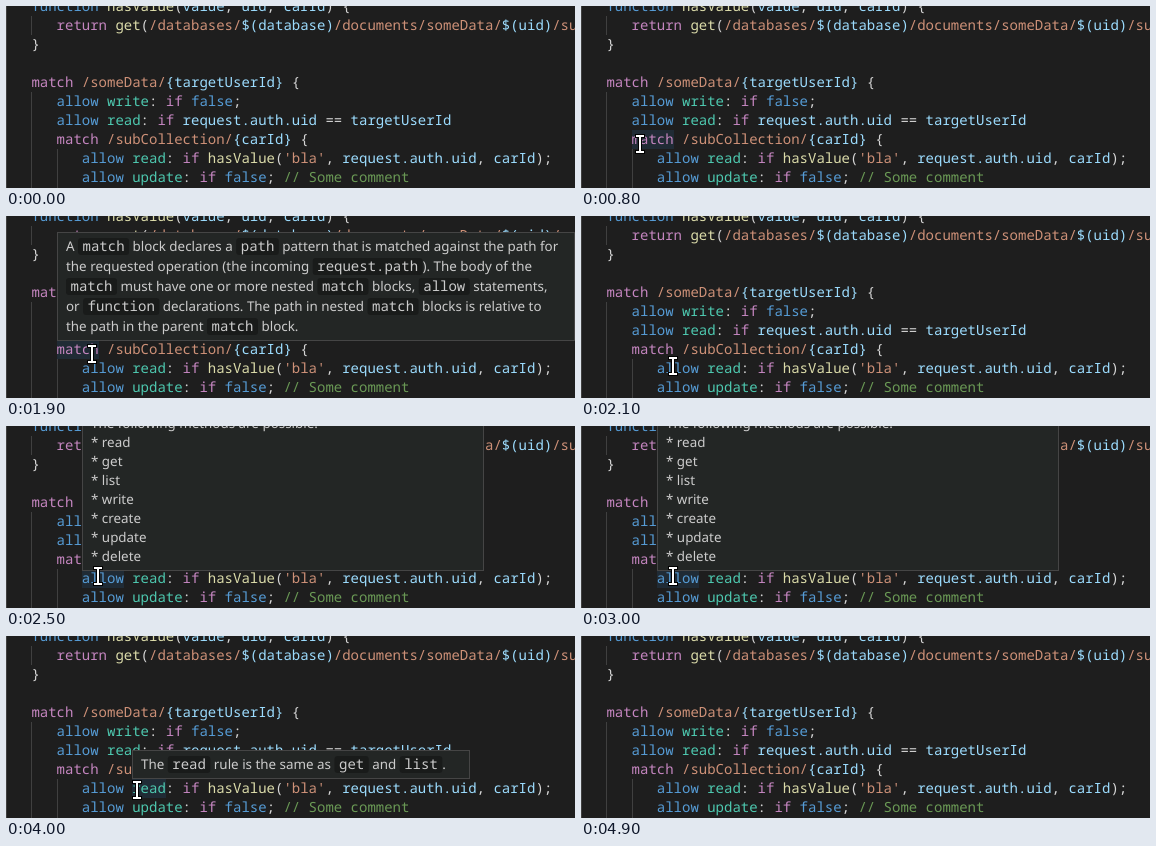
Recreate the animation shown at these times as an HTML page with a canvas. Size 569 px wide and 182 px high, loop 6000 ms.

```html
<!DOCTYPE html>
<html lang="en">
<head>
<meta charset="utf-8">
<style>
  html, body { margin: 0; height: 100%; overflow: hidden; background: #1e1e1e; }
  canvas { display: block; }
</style>
</head>
<body>
<canvas width="569" height="182"></canvas>
<script>
const ctx = document.querySelector('canvas').getContext('2d');
const LOOP = 6000, STEP = 100, LEFT = 0.2, CHAR = 8.4, ROW = 19, CHIP_PAD = 4.5;
const MONO = '14px "Noto Sans Mono", monospace';
const SANS = '13.4px "Noto Sans", sans-serif';

const colors = {
  k: '#569cd6', p: '#c586c0', f: '#dcdcaa', v: '#9cdcfe',
  o: '#ce9178', t: '#4ec9b0', w: '#d4d4d4', c: '#6a9955'
};

// Each row: indent level, then colour key and text in turn.
const code = [
  [1, 'k', 'function ', 'f', 'hasValue', 'w', '(', 'v', 'value', 'w', ', ', 'v', 'uid', 'w', ', ', 'v', 'carId', 'w', ') {'],
  [2, 'p', 'return ', 'f', 'get', 'w', '(', 'o', '/databases/', 'v', '$(database)', 'o', '/documents/someData/', 'v', '$(uid)', 'o', '/subCollection/'],
  [1, 'w', '}'],
  [0],
  [1, 'p', 'match ', 'o', '/someData/', 'v', '{targetUserId}', 'w', ' {'],
  [2, 'k', 'allow ', 't', 'write', 'w', ': ', 'p', 'if ', 'k', 'false', 'w', ';'],
  [2, 'k', 'allow ', 't', 'read', 'w', ': ', 'p', 'if ', 'v', 'request.auth.uid', 'w', ' == ', 'v', 'targetUserId'],
  [2, 'p', 'match ', 'o', '/subCollection/', 'v', '{carId}', 'w', ' {'],
  [3, 'k', 'allow ', 't', 'read', 'w', ': ', 'p', 'if ', 'f', 'hasValue', 'w', '(', 'o', "'bla'", 'w', ', ', 'v', 'request.auth.uid', 'w', ', ', 'v', 'carId', 'w', ');'],
  [3, 'k', 'allow ', 't', 'update', 'w', ': ', 'p', 'if ', 'k', 'false', 'w', '; ', 'c', '// Some comment']
];

const hovers = [
  {
    from: 800, to: 2100, fade: 900, word: [51, 124, 42],
    box: [51, 16, 518, 109], baseline: 35, leading: 20,
    lines: [
      'A `match` block declares a `path` pattern that is matched against the path for',
      'the requested operation (the incoming `request.path`). The body of the',
      '`match` must have one or more nested `match` blocks, `allow` statements,',
      'or `function` declarations. The path in nested `match` blocks is relative to',
      'the path in the parent `match` block.'
    ]
  },
  {
    from: 2400, to: 3500, fade: 2400, word: [76, 143, 42],
    box: [76, -60, 402, 205], baseline: 2, leading: ROW,
    lines: ['The following methods are possible:', '* read', '* get', '* list', '* write', '* create', '* update', '* delete']
  },
  {
    from: 3900, to: 4800, fade: 3900, word: [126, 143, 34],
    box: [126, 114, 338, 29], baseline: 133, leading: ROW,
    lines: ['The `read` rule is the same as `get` and `list`.']
  }
];

// Pointer stops: time, x, y; null hides it.
const pointer = [
  [0, null], [400, 13, 137], [500, 45, 137], [600, 59, 138], [1900, 86, 138], [2100, 92, 150],
  [3400, 107, 151], [3500, 122, 153], [3600, 131, 154], [4800, 134, 174], [4900, null]
];

function fillRect(color, x, y, w, h) {
  ctx.fillStyle = color;
  ctx.fillRect(x, y, w, h);
}

function write(text, x, y, font, color) {
  ctx.font = font;
  ctx.fillStyle = color;
  ctx.fillText(text, x, y);
  return x + ctx.measureText(text).width;
}

function drawCode() {
  for (const [x, y, h] of [[0, 0, 182], [25, 10, 19], [25, 86, 96], [51, 143, 39]]) fillRect('#404040', x, y, 1, h);
  code.forEach(([indent, ...parts], row) => {
    let x = LEFT + indent * 3 * CHAR;
    for (let i = 0; i < parts.length; i += 2) {
      x = write(parts[i + 1], x, 5 + row * ROW, MONO, colors[parts[i]]);
    }
  });
}

function drawRichLine(line, x, y) {
  line.split('`').forEach((part, i) => {
    if (!part) return;
    if (i % 2 === 0) {
      x = write(part, x, y, SANS, '#cccccc');
      return;
    }
    ctx.fillStyle = 'rgba(10, 10, 10, .4)';
    ctx.beginPath();
    ctx.roundRect(x, y - 13, part.length * CHAR + 2 * CHIP_PAD, 17, 3);
    ctx.fill();
    x = write(part, x + CHIP_PAD, y, MONO, '#cccccc') + CHIP_PAD;
  });
}

function drawHover({ box: [x, y, w, h], fade, baseline, leading, lines }, t) {
  if (t < fade) return;
  ctx.globalAlpha = t < fade + STEP ? 0.5 : 1;
  fillRect('#232625', x, y, w, h);
  ctx.strokeStyle = '#454545';
  ctx.lineWidth = 1;
  ctx.strokeRect(x + 0.5, y + 0.5, w - 1, h - 1);
  lines.forEach((line, i) => drawRichLine(line, x + 9, baseline + i * leading));
  ctx.globalAlpha = 1;
}

function drawPointer(x, y) {
  const beam = new Path2D(`M${x - 3} ${y - 8}h6M${x} ${y - 8}v16M${x - 3} ${y + 8}h6`);
  ctx.lineCap = 'square';
  for (const [color, width] of [['#000', 4], ['#fff', 2]]) {
    ctx.strokeStyle = color;
    ctx.lineWidth = width;
    ctx.stroke(beam);
  }
}

function frame(now) {
  const t = Math.floor(now % LOOP / STEP) * STEP;
  const hover = hovers.find(h => t >= h.from && t < h.to);
  const [, x, y] = pointer.findLast(stop => t >= stop[0]);
  ctx.textRendering = 'geometricPrecision';
  fillRect('#1e1e1e', 0, 0, 569, 182);
  if (hover) fillRect('rgba(38, 79, 120, .25)', ...hover.word, ROW);
  drawCode();
  if (hover) drawHover(hover, t);
  if (x !== null) drawPointer(x, y);
  requestAnimationFrame(() => frame(performance.now() - start));
}

const start = performance.now();
frame(0);
</script>
</body>
</html>
```
